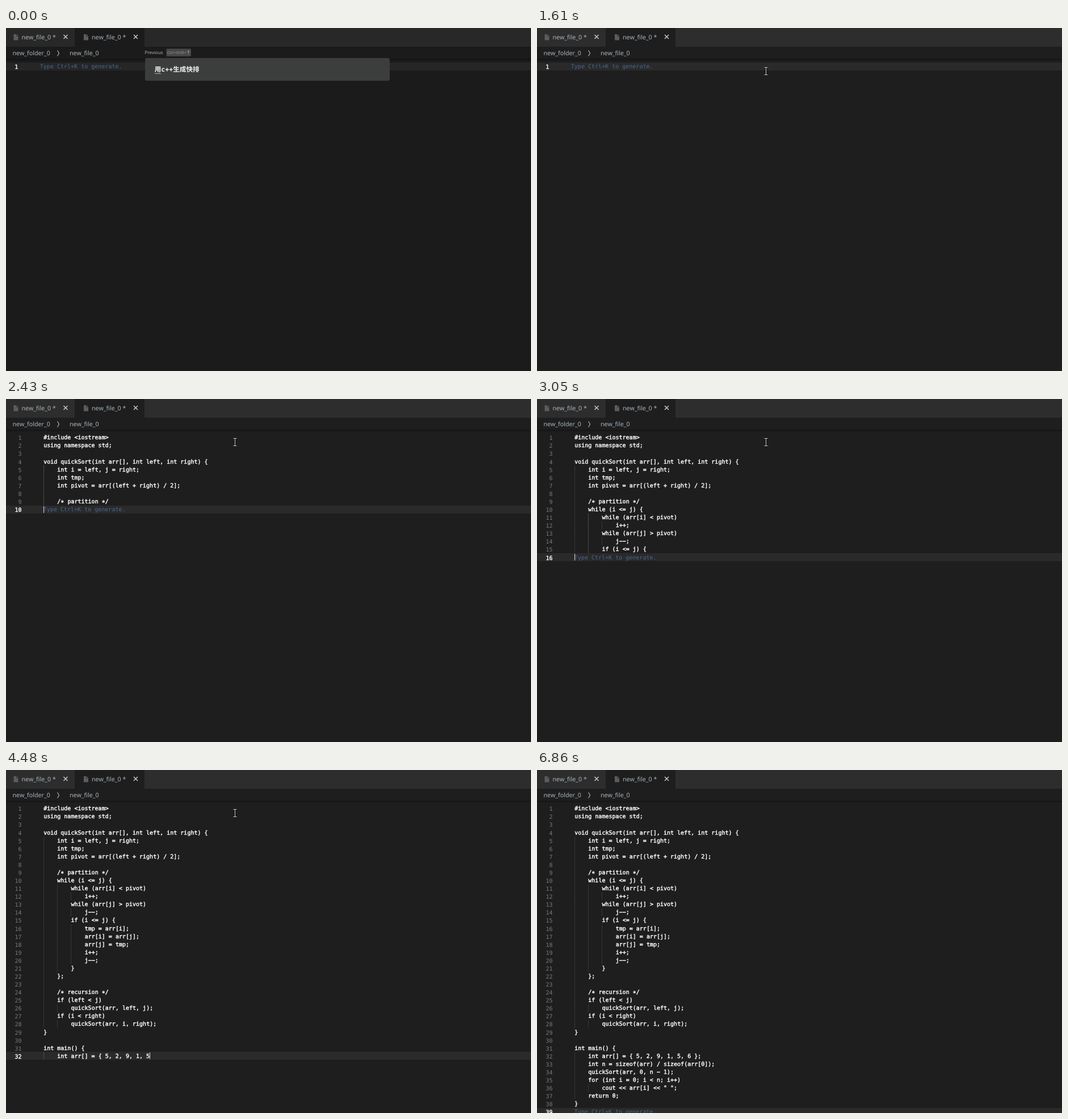
Animation of 925 by 605 pixels, one loop 6.93 s. Source, as an HTML page:

```html
<!DOCTYPE html>
<html lang="zh">
<head>
<meta charset="utf-8">
<title>Code generation in an editor</title>
<style>
html, body { margin: 0; width: 100%; height: 100%; overflow: hidden; background: #1e1e1e; }
svg { display: block; }
text { white-space: pre; text-rendering: geometricPrecision; font-family: "Noto Sans", "Open Sans", sans-serif; }
.ui { font-size: 10.7px; fill: #a9b4bd; }
.code, .num, .hint { font-family: "DejaVu Sans Mono", monospace; font-size: 10.03px; }
.code { fill: #fff; stroke: #fff; stroke-width: .42px; }
.num { fill: #7a7a7a; text-anchor: end; }
.num.on { fill: #fff; stroke: #fff; stroke-width: .4px; }
.hint { fill: #4a6790; }
.guide { stroke: #363636; }
.guide.on { stroke: #777; stroke-dasharray: 1 1; }
.prompt { font: bold 11.6px "DejaVu Sans Mono", "Noto Sans CJK SC", "Noto Sans CJK", monospace; fill: #f2f2f2; }
.cross { stroke: #c6c9cc; stroke-width: 1.5; fill: none; }
</style>
</head>
<body>
<svg id="stage" width="925" height="605" viewBox="0 0 925 605">
  <rect id="back" width="925" height="605"/>
  <g id="editor"></g>
  <rect id="bar" width="925" height="33"/>
  <rect id="tab" x="121" width="123" height="33"/>
  <rect y="54" width="925" height="2" fill="#000" opacity=".22"/>
  <rect y="56" width="925" height="2" fill="#000" opacity=".09"/>
  <g id="tabs"></g>
  <text class="ui" x="11.5" y="48">new_folder_0</text>
  <text class="ui" x="112" y="48">new_file_0</text>
  <path d="M90.5 39.5L93.5 44.5L90.5 49.5" fill="none" stroke="#a9b4bd" stroke-width="1.2"/>
  <g id="widget">
    <text x="244.6" y="46.4" font-size="8" fill="#b0b0b0">Previous</text>
    <rect x="282.5" y="36.5" width="43.5" height="13.5" rx="1.5" fill="#474747"/>
    <text x="284" y="46" font-size="6.9" fill="#929292">Ctrl+Shift+</text>
    <path d="M321.5 46.5V40M319 42.5L321.5 40L324 42.5" fill="none" stroke="#929292"/>
    <rect x="245" y="53" width="431" height="40" rx="3" fill="#3c3e3d"/>
    <text class="prompt" x="261.7" y="77.3">用c++生成快排</text>
    <rect x="262" y="80" width="11" height="1" fill="#aaa"/>
    <rect id="promptCaret" x="340" y="65" width="1" height="16" fill="#ddd"/>
  </g>
  <g id="mouse" fill="none">
    <path d="M-3 -6.5H3M0 -6.5V6.5M-3 6.5H3" stroke="#111" stroke-width="2.4"/>
    <path d="M-3 -6.5H3M0 -6.5V6.5M-3 6.5H3" stroke="#d0d0d0"/>
  </g>
</svg>
<script>
const LOOP = 6930, TYPE_START = 1604, STEP = 68.4;
const ROW = 14.08, TOP = 61, BASE = 10.3, CHAR = 6.04;

const SOURCE = `#include <iostream>
using namespace std;

void quickSort(int arr[], int left, int right) {
    int i = left, j = right;
    int tmp;
    int pivot = arr[(left + right) / 2];

    /* partition */
    while (i <= j) {
        while (arr[i] < pivot)
            i++;
        while (arr[j] > pivot)
            j--;
        if (i <= j) {
            tmp = arr[i];
            arr[i] = arr[j];
            arr[j] = tmp;
            i++;
            j--;
        }
    };

    /* recursion */
    if (left < j)
        quickSort(arr, left, j);
    if (i < right)
        quickSort(arr, i, right);
}

int main() {
    int arr[] = { 5, 2, 9, 1, 5, 6 };
    int n = sizeof(arr) / sizeof(arr[0]);
    quickSort(arr, 0, n - 1);
    for (int i = 0; i < n; i++)
        cout << arr[i] << " ";
    return 0;
}
`;

const $ = id => document.getElementById(id);

function add(parent, tag, attrs, content) {
  const node = document.createElementNS("http://www.w3.org/2000/svg", tag);
  for (const key in attrs) node.setAttribute(key, attrs[key]);
  if (content) node.textContent = content;
  parent.appendChild(node);
}

for (const x of [0, 123.5]) {
  add($("tabs"), "path", { d: `M${x + 13.5} 11H${x + 18}V14.5H${x + 21.5}V21.5H${x + 13.5}Z`, fill: "#5c5c5c" });
  add($("tabs"), "path", { d: `M${x + 18.8} 11L${x + 21.5} 13.8H${x + 18.8}Z`, fill: "#5c5c5c" });
  add($("tabs"), "text", { class: "ui", x: x + 27.5, y: 20 }, "new_file_0 *");
  add($("tabs"), "path", { class: "cross", d: `M${x + 101.5} 12L${x + 108.5} 19M${x + 108.5} 12L${x + 101.5} 19` });
}

// Typing pace: [step, characters shown]
const after = mark => SOURCE.indexOf(mark) + mark.length;
const PACE = [
  [0, 0],
  [12, after("partition */\n")],
  [21, after("if (i <= j) {\n")],
  [32, after("if (left < j)\n        quickSort(arr,")],
  [43, after("5, 6 };\n") + 4],
  [53, after("i < n;")],
  [56, SOURCE.length]
];

function typed(step) {
  if (step <= 0) return "";
  if (step >= 56) return SOURCE;
  const i = PACE.findIndex(p => p[0] >= step);
  const [s0, c0] = PACE[i - 1], [s1, c1] = PACE[i];
  let n = Math.round(c0 + (c1 - c0) * (step - s0) / (s1 - s0));
  // Whole words only
  while (/\w/.test(SOURCE[n - 1]) && /\w/.test(SOURCE[n])) n--;
  return SOURCE.slice(0, n);
}

function indentLevels(lines) {
  const own = lines.map(s => s.trim() ? Math.floor(s.search(/\S/) / 4) : -1);
  return own.map((level, i) => {
    if (level >= 0) return level;
    const below = own.slice(i + 1).find(v => v >= 0);
    const above = own.slice(0, i).reverse().find(v => v >= 0);
    return Math.min(above ?? 0, below ?? 0);
  });
}

function drawGuides(g, lines, left) {
  const levels = indentLevels(lines);
  let cur = lines.length - 1;
  while (cur > 0 && !lines[cur].trim()) cur--;
  const active = levels[cur] - 1;
  let from = cur;
  while (from > 0 && levels[from - 1] > active) from--;
  levels.forEach((level, i) => {
    for (let k = 0; k < level; k++) {
      const x = Math.round(left + k * 4 * CHAR) + .5, y = TOP + i * ROW;
      const on = k === active && i >= from;
      add(g, "line", { class: on ? "guide on" : "guide", x1: x, x2: x, y1: y, y2: y + ROW });
    }
  });
}

let shown = "";
function drawEditor(step, caret, dim) {
  const key = [step, caret, dim].join();
  if (key === shown) return;
  shown = key;
  const g = $("editor");
  g.replaceChildren();
  const lines = typed(step).split("\n");
  const last = lines.length - 1;
  const wide = lines.length > 9;
  const left = wide ? 65.8 : 59.8;
  const rowTop = i => TOP + i * ROW;
  const baseline = i => Math.round(rowTop(i) + BASE);
  const y = Math.round(rowTop(last));
  add(g, "rect", { x: 0, y, width: 925, height: 14, fill: dim ? "#262626" : "#2a2a2a" });
  drawGuides(g, lines, left);
  lines.forEach((line, i) => {
    add(g, "text", { class: i === last ? "num on" : "num", x: wide ? 27.6 : 21.4, y: baseline(i) + 1 }, String(i + 1));
    // Centred operator glyphs, as the editor font has them
    const glyphs = line.replace(/-/g, "\u2212").replace(/\*/g, "\u2217");
    const skip = line.length - line.trimStart().length;
    if (line.trim()) add(g, "text", { class: "code", x: left + .35 + skip * CHAR, y: baseline(i) }, glyphs.slice(skip));
  });
  if (!lines[last]) add(g, "text", { class: "hint", x: left, y: baseline(last) }, "Type Ctrl+K to generate.");
  if (caret) {
    const x = Math.round(left + lines[last].length * CHAR);
    add(g, "rect", { x, y: y + 1, width: 1, height: 12, fill: "#d8d8d8" });
  }
}

const between = (t, a, b) => t >= a && t < b;

function placeMouse(t) {
  $("mouse").style.display = between(t, 70, 6660) ? "" : "none";
  let x = 403, y = 76;
  if (t < 480) {
    const p = Math.max(0, Math.floor((t - 70) / STEP + .05) / 6);
    const rest = (1 - p) ** 2;
    x += 415 * rest;
    y += 432 * rest;
  } else if (t >= 5980) {
    const p = Math.min(1, (Math.floor((t - 5980) / 68) + 1) / 11);
    const e = p * p * (3 - 2 * p);
    x += 490 * e;
    y += 524 * e;
  }
  $("mouse").setAttribute("transform", `translate(${Math.round(x) + .5} ${Math.round(y)})`);
}

function render(t) {
  const open = t < 620;
  const paper = open ? "#1b1b1b" : "#1e1e1e";
  $("back").setAttribute("fill", paper);
  $("tab").setAttribute("fill", paper);
  $("bar").setAttribute("fill", open ? "#282828" : "#2d2d2d");
  $("widget").style.display = open ? "" : "none";
  $("promptCaret").style.display = t >= 210 ? "" : "none";
  const step = Math.max(0, Math.min(56, Math.floor((t - TYPE_START) / STEP)));
  const caret = between(t, 1020, TYPE_START) || (step > 0 && t < 5980) || between(t, 6400, 6860);
  drawEditor(step, caret, open);
  placeMouse(t);
}

const start = performance.now();
function tick() {
  render((performance.now() - start) % LOOP);
  requestAnimationFrame(tick);
}
tick();
</script>
</body>
</html>
```
